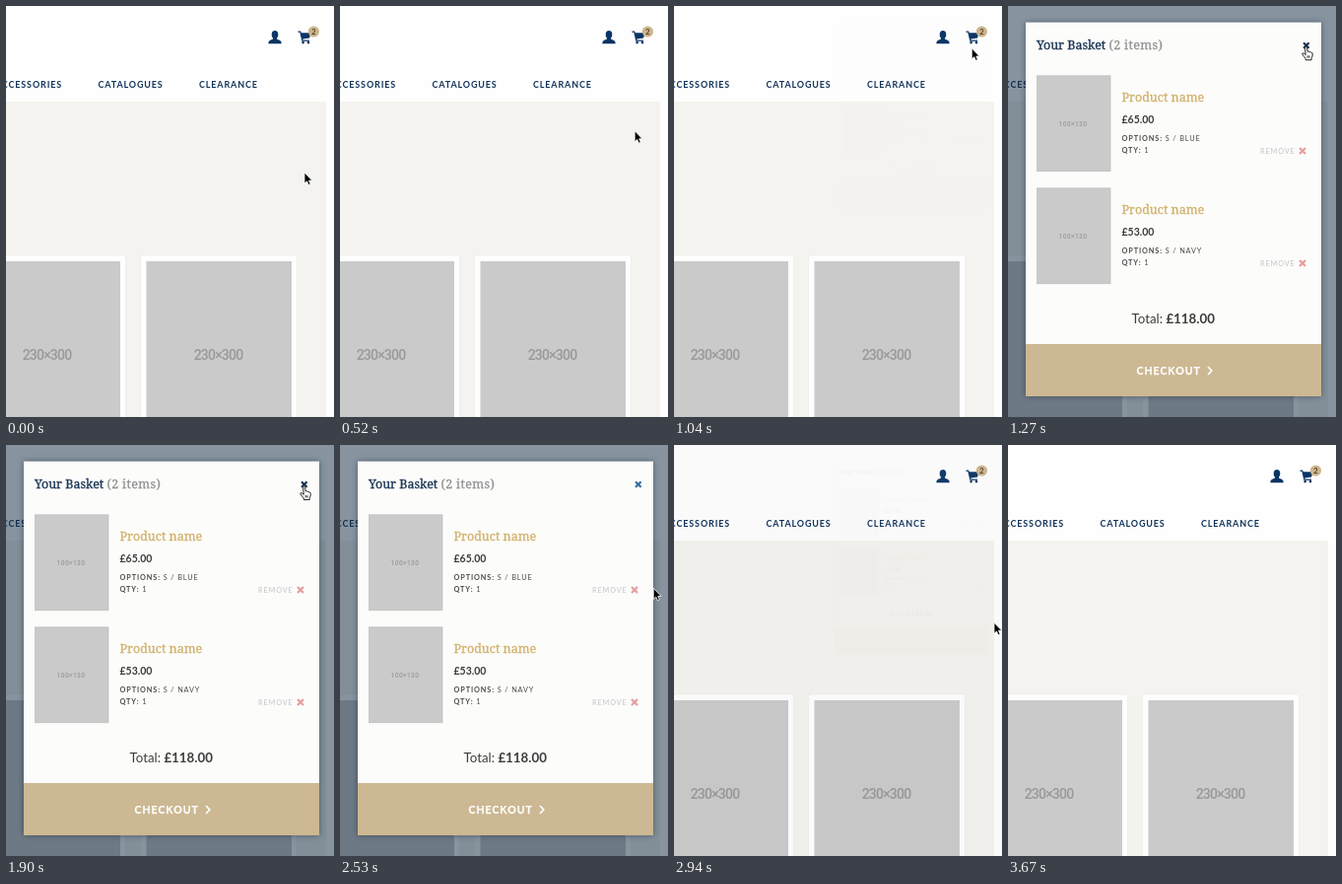
Write an HTML page that moves like this. It is 333x417 px and loops after 3.97 s.

```html
<!DOCTYPE html>
<html lang="en">
<head>
<meta charset="utf-8">
<title>Basket popup</title>
<style>
  html, body { margin: 0; width: 100%; height: 100%; overflow: hidden; background: #fff; }
  svg { display: block; width: 333px; height: 417px; }
  text { font-family: Lato, "Open Sans", sans-serif; white-space: pre; }
  .nav { font-size: 9px; font-weight: 700; letter-spacing: .85px; fill: #12345a; }
  .size { font-family: Roboto, "Liberation Sans", sans-serif; font-weight: 500; text-anchor: middle; fill: #999; }
  .serif { font-family: "Noto Serif", "Liberation Serif", serif; font-size: 12.5px; stroke-width: .3px; }
  .heading { fill: #1b3554; stroke: #1b3554; }
  .count { fill: #929292; stroke: #929292; letter-spacing: .35px; }
  .product { fill: #d1b16c; stroke: #d1b16c; }
  .small { font-size: 7.3px; letter-spacing: .88px; fill: #4c4c4c; }
  .bold { font-weight: 700; }
  .panel { filter: drop-shadow(0 0 3px rgba(0, 10, 25, .4)); }
</style>
</head>
<body>
<svg viewBox="0 0 333 417" xmlns="http://www.w3.org/2000/svg">
  <rect width="333" height="417" fill="#fefefe"/>
  <rect y="97" width="325" height="320" fill="#f4f3ef"/>
  <text class="nav" x="57" y="83" text-anchor="end">ACCESSORIES</text>
  <text class="nav" x="93.5" y="83">CATALOGUES</text>
  <text class="nav" x="196" y="83">CLEARANCE</text>
  <g fill="#0b3566">
    <ellipse cx="273" cy="29" rx="3.3" ry="4.1"/>
    <path d="M271 31H275V33.4L278.3 35Q279.7 35.8 279.7 38.2H266.3Q266.3 35.8 267.7 35L271 33.4Z"/>
    <path d="M296.5 25.5H299.2L299.8 27.3H309.3L308.2 32.6L301.2 33.4L301.5 34.5H308V35.7H300.4L298.3 26.8H296.5Z"/>
    <circle cx="301.6" cy="37.1" r="1.3"/><circle cx="307" cy="37.1" r="1.3"/>
  </g>
  <circle cx="312.4" cy="26" r="5.6" fill="#cdb48a"/>
  <text class="bold" x="312.4" y="28.7" font-size="7.5" text-anchor="middle" fill="#4b4438">2</text>
  <g id="cards"></g>

  <rect id="shade" width="333" height="417" fill="#122d44"/>
  <g id="basket">
    <rect class="panel" x="18" y="16.6" width="300" height="379.4" fill="#fcfcfa"/>
    <text class="serif heading" x="29" y="44">Your Basket <tspan class="count">(2 items)</tspan></text>
    <path id="close" d="M300 37.2L305.6 42.8M305.6 37.2L300 42.8" stroke-width="2"/>
    <g id="items"></g>
    <text x="125.5" y="321.8" font-size="13.3" fill="#3c3c3c">Total: <tspan class="bold">£118.00</tspan></text>
    <rect x="18" y="343" width="300" height="53" fill="#ccb892"/>
    <text class="bold" x="130.5" y="373.7" font-size="10.5" letter-spacing="1" fill="#fff" stroke="#fff" stroke-width=".25">CHECKOUT</text>
    <path d="M203 366L206.8 370L203 374" fill="none" stroke="#fff" stroke-width="1.7"/>
  </g>

  <g id="cursor" stroke-linejoin="round">
    <path id="arrow" d="M0 0V11L2.5 8.8L4.2 12.5L6.1 11.7L4.5 8.1H7.8Z" fill="#000" stroke="#fff" stroke-width=".8"/>
    <path id="hand" d="M-1 1Q0 -.7 1 1L1.7 5Q3 4.2 3.6 5.4Q5 4.8 5.3 6Q6.8 5.8 6.7 7.6Q6.8 10 5.6 11.4V13.5H-.3V12Q-2 10 -3.8 7.6Q-3.8 5.9 -2 6.8L-.3 8.2ZM1.6 9V11.3M3.4 9V11.3" fill="#fff" stroke="#222" stroke-width="1"/>
  </g>
</svg>
<script>
const LOOP = 3970, FADE = 200, OPEN_AT = 1040, CLOSE_AT = 2787;
const $ = id => document.getElementById(id);

const card = (x, width) => `
  <rect x="${x}" y="253" width="${width}" height="180" fill="#fefefe" stroke="#ebe9e4" stroke-width=".6"/>
  <rect x="${x + 6}" y="259" width="${width - 11.5}" height="170" fill="#cacaca"/>
  <text class="size" x="${x + width / 2 - .5}" y="359.3" font-size="14" letter-spacing="-.8">230×300</text>`;

const item = (y, price, option) => `
  <g transform="translate(0 ${y})">
    <rect x="29.3" y=".3" width="74.7" height="97" fill="#cacaca" stroke="#b9b9b9" stroke-width=".6"/>
    <text class="size" x="66" y="51.3" font-size="6.6" letter-spacing=".4">100×130</text>
    <text class="serif product" x="115.5" y="26.5">Product name</text>
    <text class="bold" x="115.5" y="48" font-size="10.5" fill="#3c3c3c">${price}</text>
    <text class="small" x="115.5" y="66"><tspan class="bold">OPTIONS:</tspan> ${option}</text>
    <text class="small" x="115.5" y="78"><tspan class="bold">QTY:</tspan> 1</text>
    <text class="small" x="256" y="79.5" style="fill:#c3c5c7">REMOVE</text>
    <path d="M296 73.5L302 79.5M302 73.5L296 79.5" stroke="#e3a09f" stroke-width="2.3"/>
  </g>`;

$("cards").innerHTML = card(-37.5, 159) + card(136.5, 159);
$("items").innerHTML = item(70.5, "£65.00", "S / BLUE") + item(184.5, "£53.00", "S / NAVY");

// Pointer path: time, x, y
const path = [
  [300, 303, 169], [450, 300, 147], [600, 298.3, 104], [750, 299.5, 65], [870, 301, 50],
  [960, 302, 45], [1100, 302.5, 41.3], [1895, 302.5, 41.3], [1980, 304, 52], [2160, 308, 88],
  [2420, 313, 128], [2480, 317, 140], [2600, 320, 152.5], [2820, 320, 152.5], [2940, 325, 180],
  [3000, 324.5, 195], [3250, 320, 300], [3420, 313, 375], [3560, 310.3, 410], [3620, 311, 413], [3670, 311, 432]
];

function pointerAt(t) {
  const next = path.findIndex(p => p[0] > t);
  if (next === 0) return path[0].slice(1);
  if (next < 0) return path[path.length - 1].slice(1);
  const a = path[next - 1], b = path[next], k = (t - a[0]) / (b[0] - a[0]);
  return [1, 2].map(i => a[i] + (b[i] - a[i]) * k);
}

// The CSS "ease" curve
const bezier = (a, b, u) => 3 * a * u * (1 - u) ** 2 + 3 * b * u * u * (1 - u) + u ** 3;
function ease(x) {
  if (x <= 0) return 0;
  if (x >= 1) return 1;
  let low = 0, high = 1;
  for (let i = 0; i < 20; i++) {
    const mid = (low + high) / 2;
    if (bezier(.25, .25, mid) < x) low = mid; else high = mid;
  }
  return bezier(.1, 1, low);
}

function render(t) {
  const shown = ease((t - OPEN_AT) / FADE) - ease((t - CLOSE_AT) / FADE);
  const scale = .5 + shown / 2;
  $("shade").setAttribute("opacity", shown * .5);
  $("basket").setAttribute("opacity", shown);
  $("basket").setAttribute("transform", `translate(318 16) scale(${scale}) translate(-318 -16)`);

  const [x, y] = pointerAt(t);
  const hover = shown > .5 && y < 48;
  $("cursor").setAttribute("transform", `translate(${x} ${y})`);
  $("arrow").setAttribute("visibility", hover ? "hidden" : "visible");
  $("hand").setAttribute("visibility", hover ? "visible" : "hidden");
  $("close").setAttribute("stroke", hover ? "#16304e" : "#2f69a0");
}

const start = performance.now();
function tick() {
  render((performance.now() - start) % LOOP);
  requestAnimationFrame(tick);
}
tick();
</script>
</body>
</html>
```
